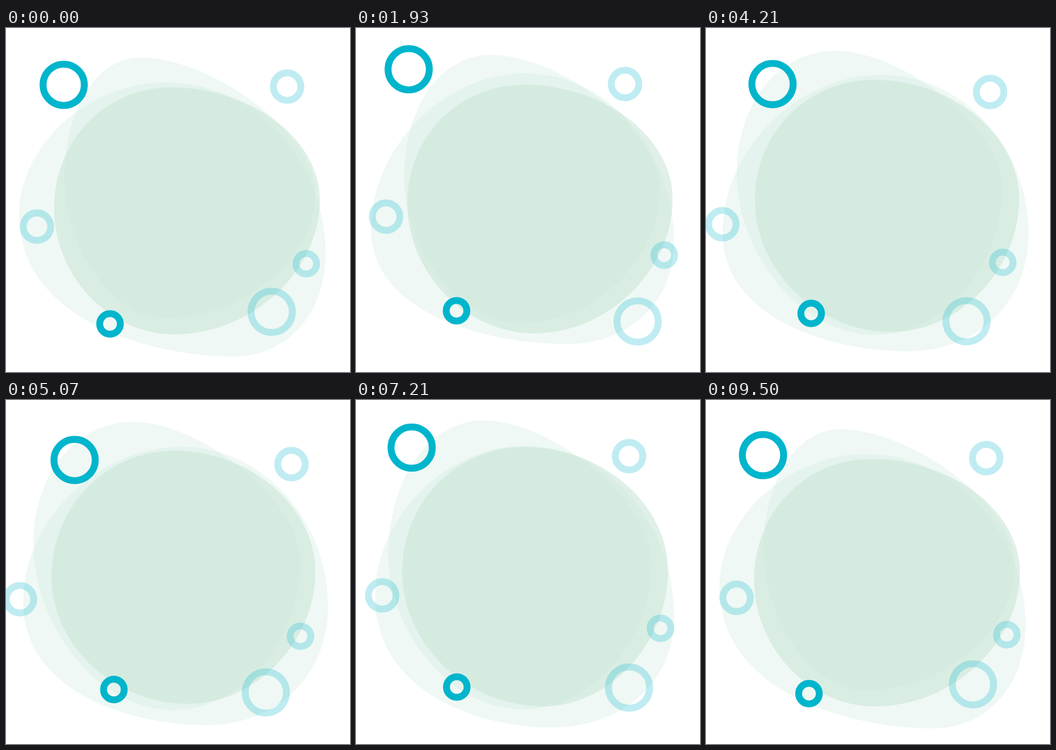
These frames come from a looping animation (640 by 640 pixels, 9570 ms). An HTML page:

```html
<!DOCTYPE html>
<html lang="en">
<head>
<meta charset="utf-8">
<title>Drifting rings</title>
<style>
  html, body { margin: 0; width: 100%; height: 100%; overflow: hidden; background: #fff; }
  svg { display: block; width: 100%; height: 100%; }
</style>
</head>
<body>
<svg id="stage" viewBox="0 0 640 640"></svg>
<script>
const LOOP = 9570;
const stage = document.getElementById('stage');

function add(tag, attrs) {
  const el = document.createElementNS('http://www.w3.org/2000/svg', tag);
  for (const k in attrs) el.setAttribute(k, attrs[k]);
  return stage.appendChild(el);
}

// Pose: left x,y, top x,y, right x,y, bottom x,y.
// Curve: start and end handle ratio of each quarter, clockwise from the left.
const BLOB_TIMES = [0, 1930, 3290, 4210, 5930, 7210, 9800];
const blobs = [
  {
    opacity: 0.3,
    curve: [0.53, 0.52, 0.55, 0.55, 0.58, 0.58, 0.4, 0.74],
    poses: [
      [24.5, 347, 297, 101, 594.5, 420, 425, 611],
      [28, 375, 315, 84, 591.5, 400, 393, 588],
      [29.5, 375, 315, 84.5, 595, 385, 385, 592.5],
      [31, 380, 325, 87, 600, 383, 375, 601.5],
      [33, 370, 322, 86, 595.5, 390, 372, 606.5],
      [35.5, 365, 315, 85, 592, 405, 363, 609.5]
    ]
  },
  {
    opacity: 0.3,
    curve: [0.57, 0.57, 0.4, 0.45, 0.53, 0.53, 0.55, 0.48],
    poses: [
      [109, 275, 250, 55, 575.5, 307, 295, 539],
      [89.5, 275, 250, 50, 565, 300, 305, 549],
      [76, 275, 250, 47, 558, 300, 308, 555.5],
      [57, 270, 240, 42.5, 551, 300, 313, 571],
      [52, 270, 236, 40, 547, 305, 308, 577.5],
      [60, 290, 237, 38, 549.5, 305, 310, 575.5]
    ]
  },
  {
    opacity: 0.6,
    curve: [0.56, 0.56, 0.54, 0.54, 0.53, 0.53, 0.54, 0.54],
    poses: [
      [89.5, 335, 307, 110.5, 584, 320, 313, 570],
      [95.5, 325, 313, 105.5, 589, 318, 332, 568],
      [100.5, 315, 315, 99.5, 593.5, 318, 350, 566],
      [91, 320, 312, 96.5, 582.5, 318, 345, 565.5],
      [82, 335, 315, 92.5, 573, 322, 335, 566],
      [86, 320, 313, 87.5, 580.5, 318, 348, 570]
    ]
  }
];

// Stops: x, y, then the bow of the path towards the next stop.
const RING_TIMES = [0, 2400, 4800, 7800, 10000];
const rings = [
  { r: 38.4, opacity: 1, stops: [
    [107.3, 105.7, 0, 0], [97, 73.5, -0.1, -4.5], [128.6, 112.6, -4.2, -4.1], [102.4, 87.5, -1.4, -1.7]] },
  { r: 19.2, opacity: 1, stops: [
    [193.5, 550.5, 0, 0], [186.3, 523.3, -5.2, -9.8], [200.5, 538.3, 6.6, 5.7], [183.4, 531.2, -1.3, -3.7]] },
  { r: 25.6, opacity: 0.25, stops: [
    [523, 109, 0, 0], [498, 103.7, 2.3, 2.5], [532.6, 120.2, -10.6, -6.3], [509.5, 105.3, 0.2, -0.7]] },
  { r: 25.6, opacity: 0.25, stops: [
    [57.6, 369.6, 0, 0], [55.8, 348.9, 0.7, -4.6], [25.5, 370.7, -0.6, 2.5], [51.5, 361.7, 0.4, -1.2]] },
  { r: 19.2, opacity: 0.25, stops: [
    [558.6, 438.5, 0, 0], [575.1, 420.9, 1.7, -2.8], [546.8, 440.4, 6.2, -6.1], [566.2, 425.4, 0, -0.4]] },
  { r: 38.4, opacity: 0.25, stops: [
    [494.3, 528, 0, 0], [527.3, 548, -8.6, 0.9], [482.4, 544.5, 4.1, -2.9], [509.2, 535.1, 0.9, 0]] }
];

for (const b of blobs) {
  b.poses.push(b.poses[0]);
  b.el = add('path', { fill: 'rgb(203,230,217)', 'fill-opacity': b.opacity });
}
for (const g of rings) {
  g.stops.push(g.stops[0]);
  g.el = add('circle', {
    r: g.r, fill: 'none', stroke: '#00b5cc', 'stroke-width': 12.8, 'stroke-opacity': g.opacity
  });
}

function segment(times, t) {
  let i = 0;
  while (i < times.length - 2 && t >= times[i + 1]) i++;
  return [i, (t - times[i]) / (times[i + 1] - times[i])];
}

// Smooth speed through each pose, at rest at both ends.
function slope(poses, i, k) {
  if (i === 0 || i === poses.length - 1) return 0;
  const T = BLOB_TIMES;
  const a = T[i] - T[i - 1], b = T[i + 1] - T[i];
  const va = (poses[i][k] - poses[i - 1][k]) / a;
  const vb = (poses[i + 1][k] - poses[i][k]) / b;
  return (va * b + vb * a) / (a + b);
}

function poseAt(poses, t) {
  const [i, u] = segment(BLOB_TIMES, t);
  const d = BLOB_TIMES[i + 1] - BLOB_TIMES[i];
  const p = u * u * (3 - 2 * u);
  return poses[i].map((v, k) =>
    v + (poses[i + 1][k] - v) * p
      + slope(poses, i, k) * d * u * (1 - u) * (1 - u)
      - slope(poses, i + 1, k) * d * u * u * (1 - u));
}

function outline(p, c) {
  let d = `M${p[0]} ${p[1]}`;
  for (let q = 0; q < 4; q++) {
    const x0 = p[2 * q], y0 = p[2 * q + 1];
    const x1 = p[(2 * q + 2) % 8], y1 = p[(2 * q + 3) % 8];
    const dx = x1 - x0, dy = y1 - y0;
    const s = c[2 * q], e = c[2 * q + 1];
    // Tangents are upright at the sides, level at top and bottom.
    d += q % 2 === 0
      ? `C${x0} ${y0 + dy * s} ${x1 - dx * e} ${y1} ${x1} ${y1}`
      : `C${x0 + dx * s} ${y0} ${x1} ${y1 - dy * e} ${x1} ${y1}`;
  }
  return d + 'Z';
}

function ringAt(stops, t) {
  const [i, u] = segment(RING_TIMES, t);
  const p = u * u * (3 - 2 * u);
  const bow = 4 * p * (1 - p);
  const a = stops[i], b = stops[i + 1];
  return [0, 1].map(k => a[k] + (b[k] - a[k]) * p + a[k + 2] * bow);
}

function draw(t) {
  for (const b of blobs) b.el.setAttribute('d', outline(poseAt(b.poses, t), b.curve));
  for (const g of rings) {
    const [x, y] = ringAt(g.stops, t);
    g.el.setAttribute('cx', x);
    g.el.setAttribute('cy', y);
  }
}

let start = null;
function tick(now) {
  if (start === null) start = now;
  draw((now - start) % LOOP);
  requestAnimationFrame(tick);
}
draw(0);
requestAnimationFrame(tick);
</script>
</body>
</html>
```
